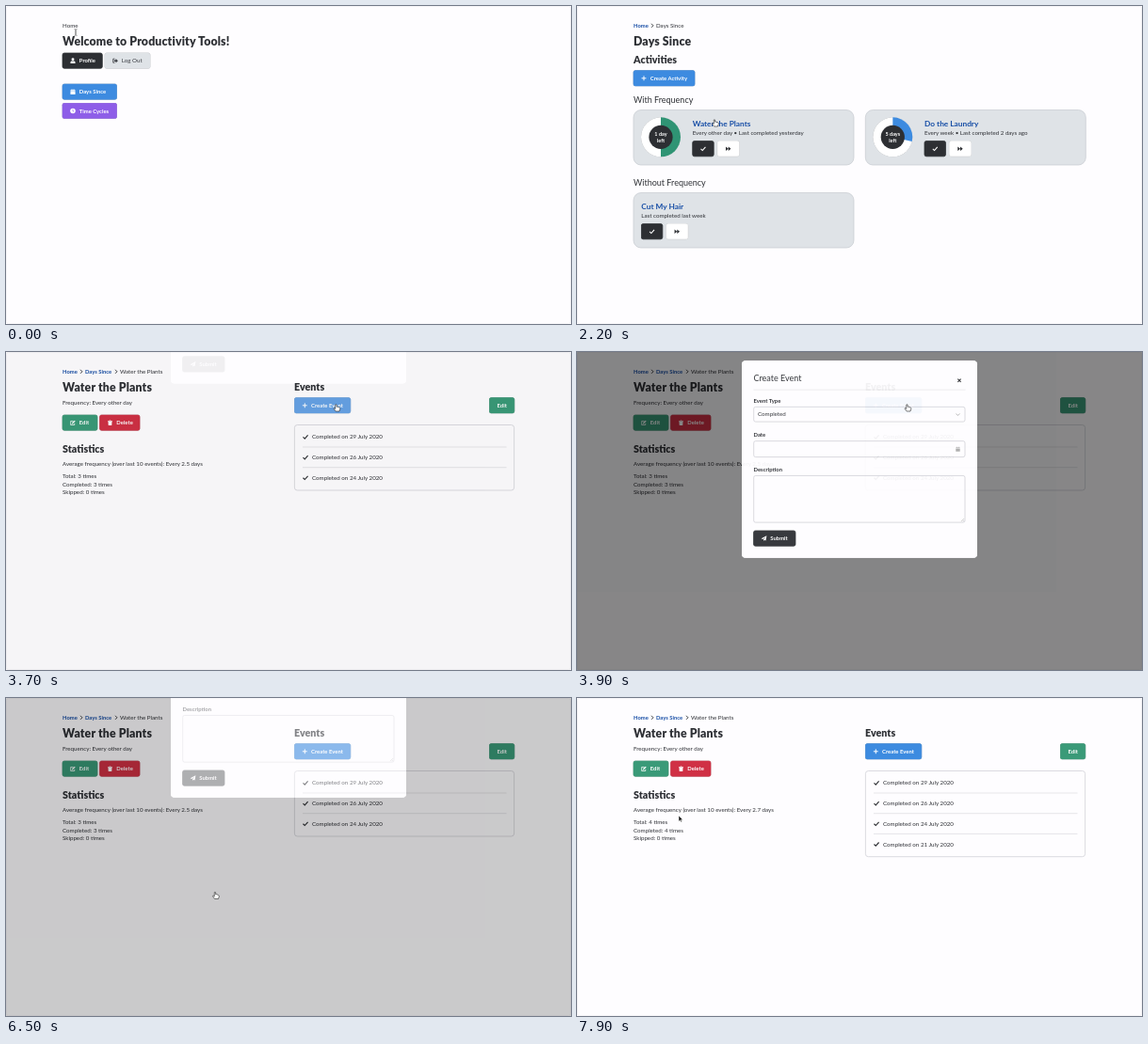
Write an HTML page that moves like this. It is 600 by 338 pixels and loops after 8000 ms.

```html
<!DOCTYPE html>
<html lang="en">
<head>
<meta charset="utf-8">
<title>Productivity Tools</title>
<style>
html, body { margin: 0; width: 100%; height: 100%; overflow: hidden; background: #fefdff; }
svg { display: block; width: 100vw; height: 100vh; }
text { font: 6.2px Lato, "Open Sans", sans-serif; fill: #2e3035; white-space: pre; }
text.h1 { font-size: 12.3px; font-weight: 900; letter-spacing: .14px; }
text.h2 { font-size: 10.7px; font-weight: 900; }
text.h3 { font-size: 9px; }
text.name { font-size: 8.3px; font-weight: 700; fill: #174ea6; }
text.bold { font-size: 5.9px; font-weight: 700; }
text.link { font-size: 5.85px; font-weight: 700; fill: #174ea6; }
.shade { filter: drop-shadow(0 .5px .5px #0005); }
</style>
</head>
<body>
<svg id="stage" viewBox="0 0 600 338"></svg>
<script>
const LOOP = 8000;
const DARK = '#2d2f33', PALE = '#dfe3e7', BLUE = '#3d8be0', GREEN = '#3a9a78',
      RED = '#d03145', PURPLE = '#8e5ee8', PAGE = '#fefdff';

// Icons live in a 10 x 10 box; C stands for the icon colour.
const icons = {
  user: '<circle cx="5" cy="2.6" r="2.5" fill="C"/><path d="M.6 10V8q0-2.4 2.4-2.4h4q2.4 0 2.4 2.4v2z" fill="C"/>',
  out: '<path d="M4 1.5H1.2v7H4" fill="none" stroke="C" stroke-width="1.5"/><path d="M3 3.8h3V1.2L10 5 6 8.8V6.2H3z" fill="C"/>',
  calendar: '<path d="M.6 1.5h2V0h1.3v1.5h2.2V0h1.3v1.5h2V3.2H.6zM.6 4h8.8v6H.6z" fill="C"/>',
  clock: '<circle cx="5" cy="5" r="4.8" fill="C"/><path d="M5 2v3.2l1.8 1.5" fill="none" stroke="#8e5ee8" stroke-width="1.2"/>',
  plus: '<path d="M5 .8v8.4M.8 5h8.4" stroke="C" stroke-width="1.7"/>',
  check: '<path d="M.8 5.3 3.8 8.2 9.3 2" fill="none" stroke="C" stroke-width="1.9"/>',
  skip: '<path d="M.3 1.2 5 5 .3 8.8zM5 1.2 9.7 5 5 8.8z" fill="C"/>',
  edit: '<path d="M6 2H1v7h7V6" fill="none" stroke="C" stroke-width="1.3"/><path d="M3.5 5.2 8 .6l1.6 1.6L5 6.7l-2 .5z" fill="C"/>',
  trash: '<path d="M.8 1h2.6L4 .2h2l.6.8h2.6v1.3H.8zM1.5 3h7L8 10H2z" fill="C"/>',
  send: '<path d="M10 0 8.5 9 5.7 7.8 4.2 10V7L8 2.6 3 6.6 0 5.4z" fill="C"/>',
  close: '<path d="M2 2 8 8M8 2 2 8" stroke="C" stroke-width="2"/>',
  right: '<path d="M3 1 7 5 3 9" fill="none" stroke="C" stroke-width="1.8"/>',
  down: '<path d="M1.5 3.5 5 7 8.5 3.5" fill="none" stroke="C" stroke-width="1.1"/>'
};

const text = (x, y, s, cls = '', more = '') => `<text x="${x}" y="${y}" class="${cls}" ${more}>${s}</text>`;
const rect = (x, y, w, h, fill, r = 0, more = '') =>
  `<rect x="${x}" y="${y}" width="${w}" height="${h}" rx="${r}" fill="${fill}" ${more}/>`;
const line = (x1, x2, y, c = '#dcdce0') => `<path d="M${x1} ${y}H${x2}" stroke="${c}" stroke-width=".7"/>`;
const group = (id, body) => `<g id="${id}">${body}</g>`;
const icon = (name, cx, cy, size = 6, color = '#fff') =>
  `<g transform="translate(${cx - size / 2} ${cy - size / 2}) scale(${size / 10})">${icons[name].replaceAll('C"', color + '"')}</g>`;

function button(x, y, w, fill, name, label, ink = '#fff') {
  const style = ink === '#fff' ? 'bold' : '';
  return rect(x, y, w, 16.3, fill, 2, `class="shade" stroke="${fill}" stroke-width=".6"`) +
    (name ? icon(name, x + (label ? 11 : w / 2), y + 8.2, 5.8, ink) : '') +
    (label ? text(x + (name ? 17.8 : 8.3), y + 10.3, label, style, `style="fill:${ink}"`) : '');
}

function crumbs(...names) {
  const xs = [60, 84, 121];
  return names.map((s, i) =>
    text(xs[i], 23, s, i < names.length - 1 ? 'link' : '') +
    (i ? icon('right', xs[i] - 4, 20.8, 5, DARK) : '')).join('');
}

function donut(cx, cy, part, color, label) {
  const a = part * 2 * Math.PI, r = 21;
  return `<g class="shade"><circle cx="${cx}" cy="${cy}" r="${r}" fill="#fff"/></g>
    <path d="M${cx} ${cy}v${-r}A${r} ${r} 0 0 1 ${cx + r * Math.sin(a)} ${cy - r * Math.cos(a)}z" fill="${color}"/>
    <circle cx="${cx}" cy="${cy}" r="12.6" fill="${DARK}"/>` +
    [label, 'left'].map((s, i) =>
      text(cx, cy - 1.5 + i * 7.3, s, 'bold', 'text-anchor="middle" style="fill:#fff;font-size:5.5px"')).join('');
}

function card(x, y, inset, title, note) {
  const left = x + inset;
  return rect(x, y, 234, 58.5, PALE, 8, 'stroke="#c6cad0" stroke-width=".7"') +
    text(left, y + 17.5, title, 'name') + text(left, y + 26.6, note) +
    button(left, y + 33, 22.5, DARK, 'check') + button(left + 26.5, y + 33, 23, '#fff', 'skip', '', DARK);
}

const home = text(60, 23, 'Home') + text(60, 42, 'Welcome to Productivity Tools!', 'h1') +
  button(60, 50, 42.3, DARK, 'user', 'Profile') + button(105, 50, 48, PALE, 'out', 'Log Out', '#3c3e44') +
  group('daysButton', button(60, 83, 57.6, BLUE, 'calendar', 'Days Since')) +
  button(60, 103.3, 57.6, PURPLE, 'clock', 'Time Cycles');

const days = crumbs('Home', 'Days Since') + text(60, 42, 'Days Since', 'h1') +
  group('daysBody', text(60, 61, 'Activities', 'h2') +
    button(60, 68.6, 65, BLUE, 'plus', 'Create Activity') +
    text(60, 103, 'With Frequency', 'h3') +
    card(60, 110.5, 62.7, 'Water the Plants', 'Every other day • Last completed yesterday') +
    donut(89, 139.3, .5, '#2f9474', '1 day') +
    card(306.3, 110.5, 62.7, 'Do the Laundry', 'Every week • Last completed 2 days ago') +
    donut(335.3, 139.3, 2 / 7, BLUE, '5 days') +
    text(60, 191, 'Without Frequency', 'h3') +
    card(60, 198.5, 8.3, 'Cut My Hair', 'Last completed last week'));

const dates = [29, 26, 24, 21];
const eventRow = (d, i) => {
  const y = 90.2 + i * 21.7;
  return (i ? line(315, 531.5, y - 10.9) : '') + icon('check', 318, y, 6, DARK) +
    text(325, y + 2.2, `Completed on ${d} July 2020`);
};
const eventList = n => rect(306.4, 77.5, 233.2, 4.4 + n * 21.7, 'none', 3, 'stroke="#d2d2d8" stroke-width=".8"') +
  dates.slice(0, n).map(eventRow).join('');
const stats = (n, mean) =>
  text(60, 120.8, `Average frequency (over last 10 events): Every ${mean} days`) +
  [`Total: ${n}`, `Completed: ${n}`, 'Skipped: 0'].map((s, i) => text(60, 133.7 + i * 8.8, s + ' times')).join('');

const plant = crumbs('Home', 'Days Since', 'Water the Plants') + text(60, 42, 'Water the Plants', 'h1') +
  text(60, 56.2, 'Frequency: Every other day') +
  button(60, 67, 37, GREEN, 'edit', 'Edit') + button(99.5, 67, 42.5, RED, 'trash', 'Delete') +
  text(60, 106.7, 'Statistics', 'h2') + text(306, 41, 'Events', 'h2') +
  group('createButton', button(306.3, 48.6, 59.5, BLUE, 'plus', 'Create Event')) +
  button(513.3, 48.6, 26.5, GREEN, '', 'Edit') +
  group('before', eventList(3) + stats(3, '2.5')) + group('after', eventList(4) + stats(4, '2.7'));

const field = (y, h) => rect(187.7, y, 224.3, h, PAGE, 2, 'stroke="#d0d0d6" stroke-width=".8"');
// The dimming surrounds the dialog and leaves the page beneath it clear.
const dimming = '<path d="M0-400H600V800H0zM179 21H421q4 0 4 4V226.5q0 4-4 4H179q-4 0-4-4V25q0-4 4-4z" fill-rule="evenodd" fill-opacity=".5"/>';
const modal = dimming + rect(175, 21, 250, 209.5, PAGE, 4) + text(187.5, 43, 'Create Event', 'h3') +
  icon('close', 406, 42.2, 5.5, DARK) + line(187.5, 412.5, 52, '#e2e2e6') +
  text(187.5, 66, 'Event Type', 'bold') + field(70.2, 15.8) + text(192, 80.3, 'Completed') +
  icon('down', 404.5, 78.2, 5.5, '#888') +
  text(187.5, 101.8, 'Date', 'bold') + field(106.5, 17) +
  group('focus', rect(187.7, 106.5, 224.3, 17, 'none', 2, 'stroke="#5b9fe6" stroke-width="1"')) +
  group('date', text(192, 117, '21 July 2020')) + icon('calendar', 404.5, 115, 5, '#aaa') +
  text(187.5, 139, 'Description', 'bold') + field(143.3, 49.7) +
  '<path d="M408 192l3-3M410 192l1-1" stroke="#999" stroke-width=".5"/>' +
  group('submit', button(187.5, 201.8, 44.5, DARK, 'send', 'Submit'));

const pointers =
  group('beam', '<path d="M-1.5-3.5q1.5 0 1.5 1V2.5q0 1-1.5 1M1.5-3.5Q0-3.5 0-2.5V2.5q0 1 1.5 1" fill="none" stroke="#555" stroke-width=".6"/>') +
  group('arrow', '<path d="M0 0V6.2L1.5 4.9 2.5 7 3.4 6.6 2.5 4.5H4.4z" fill="#111" stroke="#fff" stroke-width=".5"/>') +
  group('hand', '<path d="M-.7 0Q0-.7.6 0V2.2Q1.6 1.7 2.1 2.5 3.2 2.2 3.6 3.1 4.5 3.3 4.3 4.5L3.5 7H-.4L-2.4 4.3Q-2.5 3.3-1.5 3.7L-.7 4.4z" fill="#fff" stroke="#222" stroke-width=".6"/>');

stage.innerHTML = rect(0, 0, 600, 338, PAGE) +
  rect(.5, .5, 599, 337, 'none', 2, 'stroke="#f5f4f7"') +
  group('home', home) + group('days', days) + group('plant', plant) +
  group('modal', modal) + group('pointer', pointers);

const $ = id => document.getElementById(id);
const show = (id, on) => { $(id).style.display = on ? '' : 'none'; };
const fade = (id, v) => { $(id).style.opacity = v; };
const move = (id, x, y) => $(id).setAttribute('transform', `translate(${x} ${y})`);
const smooth = x => { x = Math.min(1, Math.max(0, x)); return x * x * (3 - 2 * x); };

// Pointer stops: time, x, y
const path = [[0, 74, 28], [500, 92, 90], [950, 92, 90], [1600, 146, 121], [2650, 146, 121], [3350, 350.5, 56],
  [4000, 350.5, 56], [4450, 290, 115], [5050, 290, 115], [5600, 230, 207], [6300, 230, 207], [6480, 222, 206.5],
  [6700, 222, 206.5], [7250, 135, 140], [7800, 108, 125], [LOOP, 108, 125]];
// Pointer shape from each time on
const shapes = [[0, 'beam'], [200, 'arrow'], [400, 'hand'], [780, 'arrow'], [1500, 'hand'], [2650, 'arrow'],
  [3250, 'hand'], [4080, 'arrow'], [4300, 'beam'], [5150, 'arrow'], [5500, 'hand'], [6650, 'arrow']];

function draw(t) {
  show('home', t < 750);
  show('days', t >= 750 && t < 2580);
  show('daysBody', t >= 1000);
  show('plant', t >= 2850);
  show('before', t < 6900);
  show('after', t >= 6900);
  show('focus', t >= 4450);
  show('date', t >= 5050);
  fade('daysButton', t > 430 ? .78 : 1);
  fade('createButton', t > 3270 && t < 4050 ? .78 : 1);
  fade('submit', t > 5520 ? .93 : 1);

  const open = smooth((t - 3658) / 284) - smooth((t - 6341) / 284);
  show('modal', open > 0);
  fade('modal', open);
  move('modal', 0, -210 * (1 - open));

  const i = path.findIndex(p => p[0] > t), [t0, x0, y0] = path[i - 1], [t1, x1, y1] = path[i];
  const k = smooth((t - t0) / (t1 - t0));
  move('pointer', x0 + (x1 - x0) * k, y0 + (y1 - y0) * k);
  const shape = shapes.findLast(s => s[0] <= t)[1];
  for (const id of ['beam', 'arrow', 'hand']) show(id, id === shape);
}

const start = performance.now();
function tick() {
  draw((performance.now() - start) % LOOP);
  requestAnimationFrame(tick);
}
tick();
</script>
</body>
</html>
```
